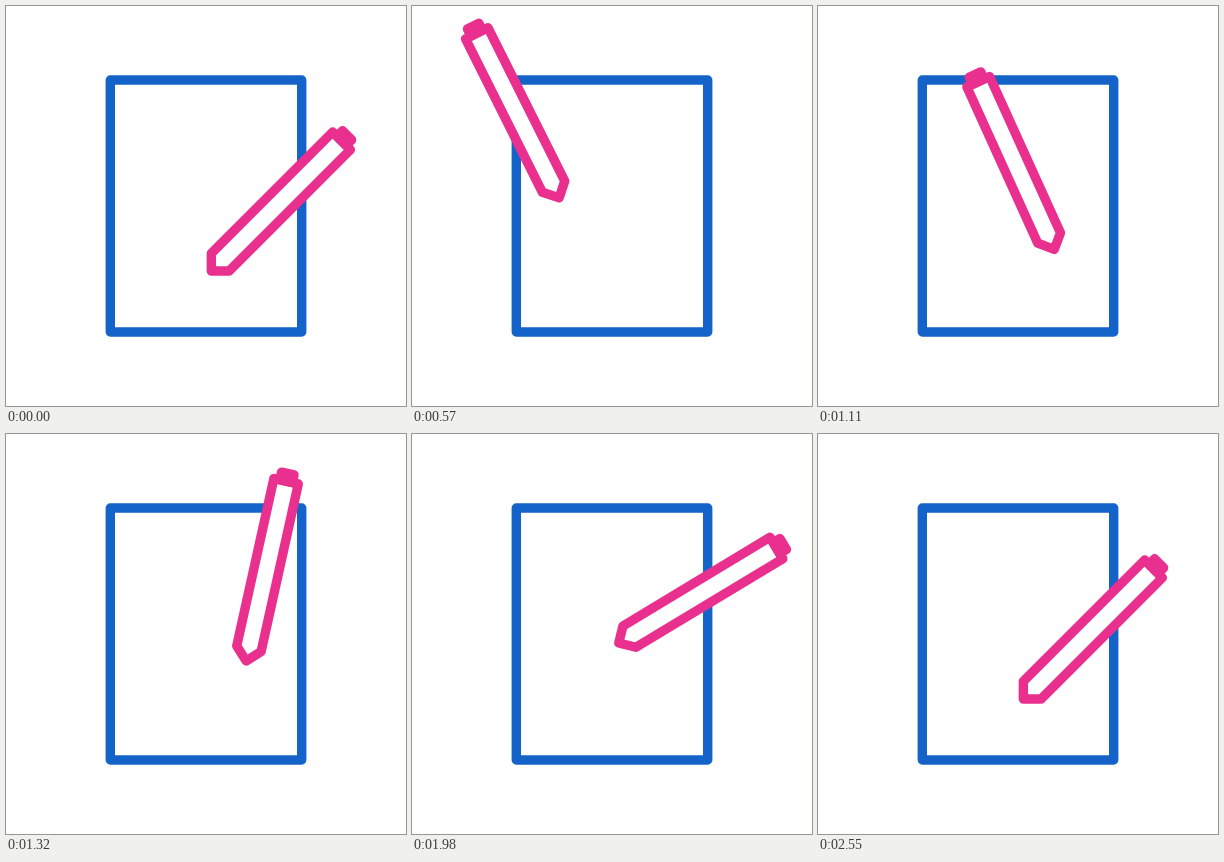
These frames come from a looping animation (400 px wide and 400 px high, 4.61 s). An HTML page:

```html
<!DOCTYPE html>
<html lang="en">
<head>
<meta charset="utf-8">
<title>Pen and paper</title>
<style>
  html, body { margin: 0; width: 100%; height: 100%; overflow: hidden; background: #fff; }
  svg { display: block; width: 100%; height: 100%; }
</style>
</head>
<body>
<svg viewBox="0 0 400 400" fill="#fff" stroke-width="9.4" stroke-linejoin="round">
  <rect x="104.3" y="74" width="191.4" height="252" stroke="#1463c9"/>
  <g id="pen" stroke="#ea308f">
    <path d="M0 99.5L-12.5 87V-84.6H12.5V87Z"/>
    <path d="M-6.4 -84.6V-92.5H6.4V-84.6Z" fill="#ea308f"/>
  </g>
</svg>
<script>
const LOOP = 4610, STEP = 30, END = 2550;
const pen = document.getElementById('pen');

const home = [275.7, 194.7], left = [98, 98], right = [286, 116.5];

// Three sweeps of the pen's centre: start time, end time, Bezier points
const sweeps = [
  [0, 640, home, [288, 197], [141, 147], left],
  [640, 1530, left, [133, 192], [235, 147], right],
  [1530, END, right, [275, 124], [324, 225], home]
];

// Lean of the pen: start time, end time, degrees from and to
const leans = [
  [0, 835, 45, -49],
  [835, 1730, -49, 60.3],
  [1850, END, 60.3, 45]
];

// The part playing at t, and its eased progress
function at(parts, t) {
  const part = parts.findLast(p => t >= p[0]);
  const [from, to, ...values] = part;
  const p = Math.min((t - from) / (to - from), 1);
  return [p * p * (3 - 2 * p), ...values];
}

function draw(now) {
  const t = Math.min(Math.floor(now % LOOP / STEP) * STEP, END);
  const [s, a, b, c, d] = at(sweeps, t), q = 1 - s;
  const [x, y] = [0, 1].map(i =>
    q ** 3 * a[i] + 3 * s * q * (q * b[i] + s * c[i]) + s ** 3 * d[i]);
  const [k, from, to] = at(leans, t);
  pen.setAttribute('transform', `translate(${x} ${y}) rotate(${from + (to - from) * k})`);
}

let start;
function tick(now) {
  start ??= now;
  draw(now - start);
  requestAnimationFrame(tick);
}
draw(0);
requestAnimationFrame(tick);
</script>
</body>
</html>
```
